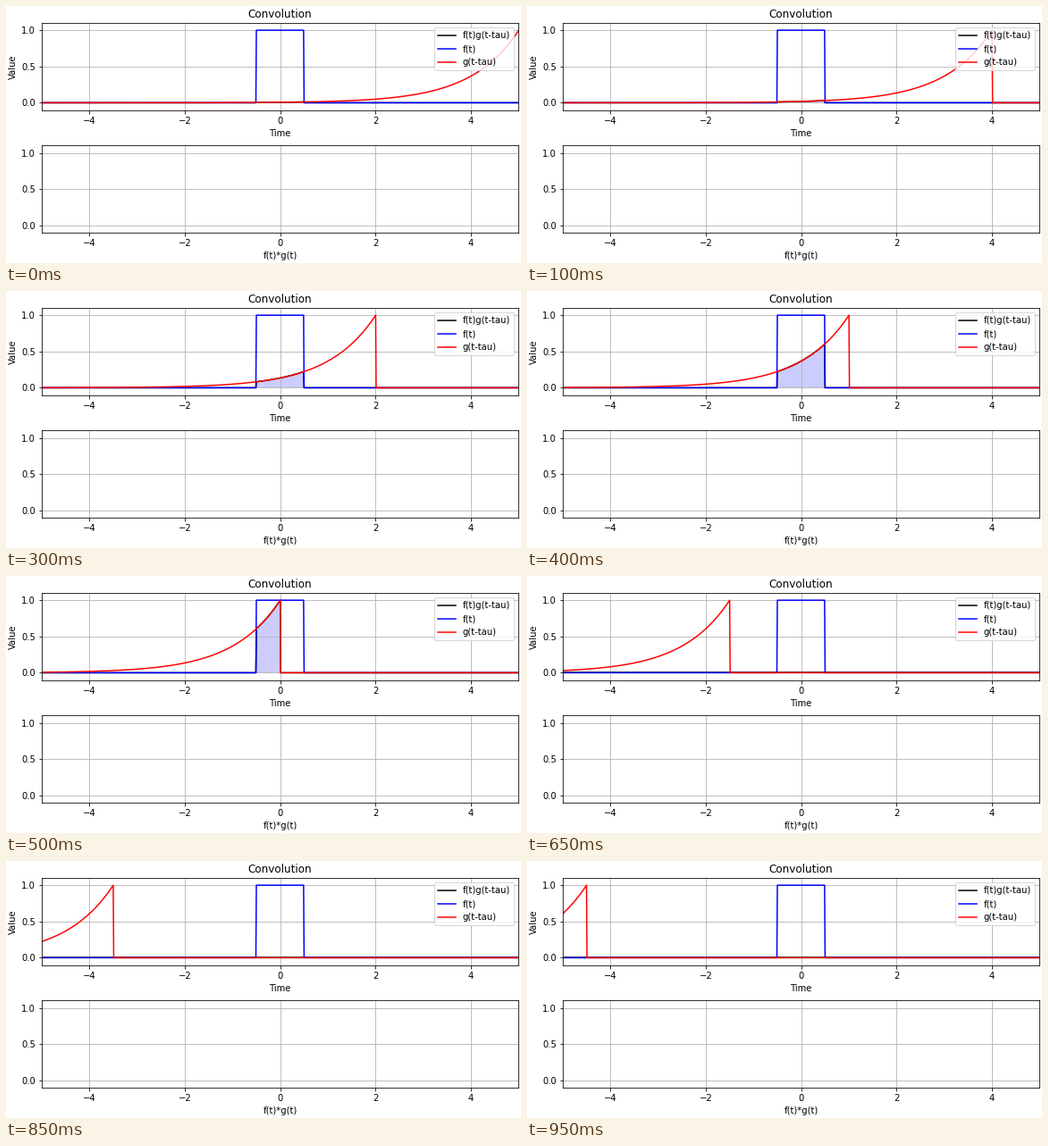
Write a matplotlib script that moves like this. It is 576 px wide and 288 px high and loops after 1 s.

```python
import numpy as np
import matplotlib.pyplot as plt
from matplotlib.animation import FuncAnimation

FRAMES = 20
INTERVAL = 50  # ms
STEP = 0.5     # shift of g per frame

time = np.arange(-500, 500) / 100


def pulse(t):
    return np.where((t >= -0.5) & (t < 0.5), 1.0, 0.0)


def decay(t):
    return np.where(t >= 0, np.exp(-np.maximum(t, 0)), 0.0)


def style_axes(ax, xlabel):
    ax.set(xlim=(time[0], time[-1]), ylim=(-0.1, 1.1), xlabel=xlabel,
           xticks=range(-4, 5, 2), yticks=[0, 0.5, 1])
    ax.grid(True)


plt.rcParams["font.family"] = "DejaVu Sans"
fig, (top, bottom) = plt.subplots(2, 1, figsize=(8, 4), dpi=72,
                                  layout="constrained")
fig.get_layout_engine().set(hspace=0.0617)
style_axes(top, "Time")
style_axes(bottom, "f(t)*g(t)")
top.set(title="Convolution", ylabel="Value")

f = pulse(time)
product_line, = top.plot(time, 0 * time, "k", label="f(t)g(t-tau)")
top.plot(time, f, "b", label="f(t)")
shifted_line, = top.plot(time, 0 * time, "r", label="g(t-tau)")
area, = top.fill(time, 0 * time, facecolor="b", alpha=0.2, linewidth=0)
top.legend(loc="upper right")


def update(frame):
    tau = 5 - STEP * frame
    g = decay(tau - time)
    product = f * g
    shifted_line.set_ydata(g)
    product_line.set_ydata(product)
    outline = np.column_stack([time, product])
    area.set_xy(np.vstack([[time[0], 0], outline, [time[-1], 0]]))
    return product_line, shifted_line, area


animation = FuncAnimation(fig, update, frames=FRAMES, interval=INTERVAL,
                          repeat=True, repeat_delay=0)
plt.show()
```
